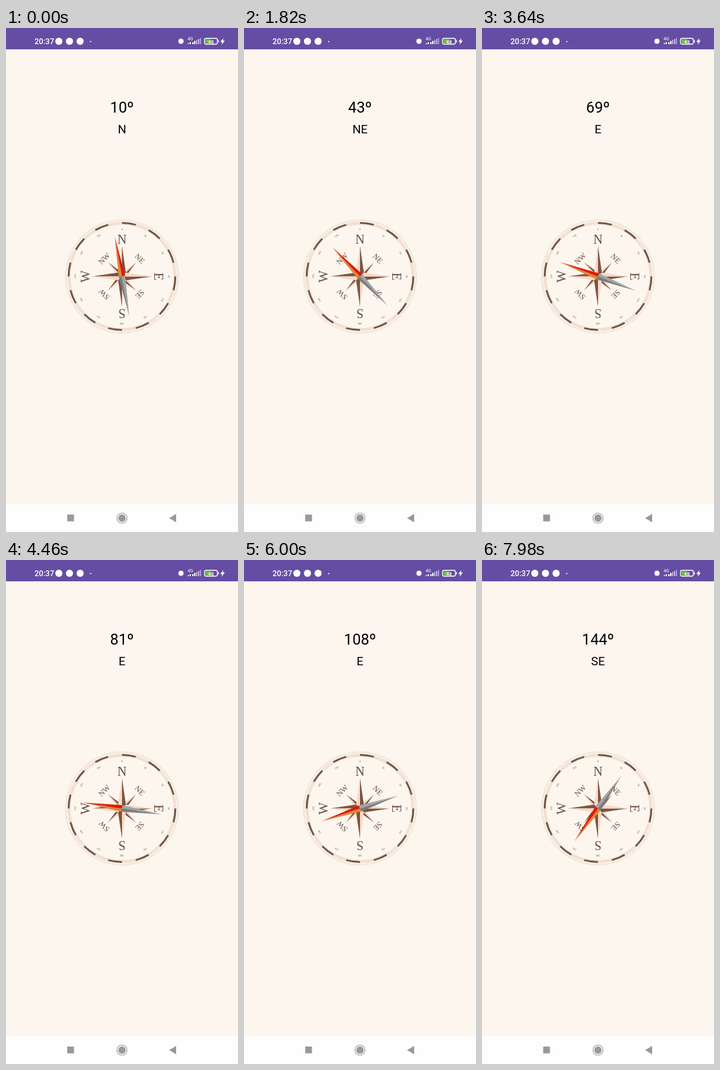
Write an HTML page that moves like this. It is 360x780 px and loops after 8 s.

```html
<!DOCTYPE html>
<html lang="en">
<head>
<meta charset="utf-8">
<title>Compass</title>
<style>
  html, body { margin: 0; width: 100%; height: 100%; overflow: hidden; background: #fdf6ef; }
  svg { display: block; width: 360px; height: 780px; }
  text { text-anchor: middle; font-family: Roboto, sans-serif; }
  .dial text { font-family: "Liberation Serif", serif; fill: #66503f; }
</style>
</head>
<body>
<svg viewBox="0 0 360 780">
  <rect width="360" height="780" fill="#fdf6ef"/>
  <rect width="360" height="33" fill="#654da4"/>

  <g fill="#fff">
    <text x="59.5" y="25" font-size="12" font-weight="500">20:37</text>
    <circle cx="82" cy="20.5" r="5.5"/>
    <circle cx="98.5" cy="20.5" r="5.5"/>
    <circle cx="115" cy="20.5" r="5.5"/>
    <circle cx="131.5" cy="21" r="1"/>
    <circle cx="271.5" cy="20.5" r="4"/>
    <text x="286" y="19" font-size="7">4G</text>
    <path d="M282 23.5h2v1.5h-2zM285 22h2v3h-2zM289 22h2v3h-2zM292 20h2v5h-2z"/>
    <path d="M295 18.5h2v6.5h-2zM298 17h2v8h-2zM301 15.5h1.5v9.5h-1.5z" opacity=".6"/>
    <rect x="308" y="16" width="20" height="9" rx="2.5" fill="none" stroke="#fff" stroke-width="1.3"/>
    <rect x="309.5" y="17.5" width="9" height="6" rx="1" fill="#6fbf3f"/>
    <rect x="329" y="18.5" width="1.2" height="4"/>
    <text x="318" y="23.5" font-size="8" font-weight="500">48</text>
    <path d="M337.5 15.5l-5 6h3l-1 4.5 5-6.5h-3z"/>
  </g>

  <text id="degrees" x="180" y="131" font-size="23.3"></text>
  <text id="heading" x="180" y="163" font-size="18.5"></text>

  <g transform="translate(180 384.5)">
    <g id="dial" class="dial"></g>
    <g id="needle">
      <path d="M0-62.5L-5 0H0z" fill="#d98a34"/>
      <path d="M0-62.5L5 0H0z" fill="#e61408"/>
      <path d="M0 62.5L-5 0H0z" fill="#7a7d80"/>
      <path d="M0 62.5L5 0H0z" fill="#a2a4a6"/>
    </g>
  </g>

  <rect y="737" width="360" height="43" fill="#fefefe"/>
  <g fill="#999">
    <rect x="95" y="753" width="10.5" height="10.5"/>
    <circle cx="180" cy="758.5" r="5.7"/>
    <circle cx="180" cy="758.5" r="7.8" fill="none" stroke="#999" stroke-width="1.1"/>
    <path d="M253 758.500L264 752v13z"/>
  </g>
</svg>
<script>
const LOOP = 8000;
const $ = id => document.getElementById(id);
const polar = (r, deg) => {
  const a = deg * Math.PI / 180;
  return [r * Math.sin(a), -r * Math.cos(a)].map(v => v.toFixed(2)).join(' ');
};

const arc = (r, from, to, color, width) =>
  `<path d="M${polar(r, from)}A${r} ${r} 0 0 1 ${polar(r, to)}" fill="none" stroke="${color}" stroke-width="${width}"/>`;
const ring = (r, color, width, dash = '') =>
  `<circle r="${r}" fill="none" stroke="${color}" stroke-width="${width}" stroke-dasharray="${dash}"/>`;
const label = (text, r, deg, size) =>
  `<text transform="rotate(${deg}) translate(0 ${-r})" y="${size * 0.33}" font-size="${size}">${text}</text>`;

// Each rose point is dark on its clockwise half and pale on the other.
const halfPoint = (deg, length, base, side, color) =>
  `<path d="M0 0L${polar(length, deg)}L${polar(base, deg + side * 45)}z" fill="${color}"/>`;
const rosePoint = (deg, length, base) =>
  halfPoint(deg, length, base, 1, '#7d5440') + halfPoint(deg, length, base, -1, '#f6d9c6');

function drawDial() {
  let out = ring(87, '#d6c6b6', 3, '0.6 1.6') + ring(82.8, '#f3dfd0', 3.2) + ring(80.6, '#ddc8b4', 0.6);
  for (let deg = 0; deg < 360; deg += 30) {
    out += arc(82.8, deg, deg + 15, '#6f5344', 2.8) + label(deg, 72.5, deg, 4);
  }
  for (let deg = 45; deg < 360; deg += 90) out += rosePoint(deg, 31, 6);
  for (let deg = 0; deg < 360; deg += 90) out += rosePoint(deg, 47, 8.5);
  ['N', 'NE', 'E', 'SE', 'S', 'SW', 'W', 'NW'].forEach((name, i) => {
    out += name.length > 1 ? label(name, 39, i * 45, 12) : label(name, 57, i * 45, 20);
  });
  $('dial').innerHTML = out;
}

// Sensor readings: [start of a run, evenly spaced readings until the next run].
const runs = [
  [0, 1], [160, 2], [440, 1], [580, 5], [1240, 5], [1820, 1], [1940, 4], [2380, 10],
  [3520, 1], [3640, 1], [3780, 7], [4600, 5], [5160, 1], [5300, 4], [5740, 9],
  [6840, 1], [6880, 9], [7980, 1]
];
const readings = runs.flatMap(([start, count], i) => {
  const end = i + 1 < runs.length ? runs[i + 1][0] : LOOP;
  return Array.from({ length: count }, (_, k) => Math.round((start + (end - start) * k / count) / 20) * 20);
});

const bearings = [[0, 10.4], [440, 19.5], [1820, 43.5], [3640, 69.4], [5160, 95.3], [6840, 122.5], [7980, 144.4]];
const slope = i => {
  const [t0, b0] = bearings[Math.max(0, i - 1)];
  const [t1, b1] = bearings[Math.min(bearings.length - 1, i + 1)];
  return (b1 - b0) / (t1 - t0);
};

// Smooth cubic through the measured bearings.
function bearingAt(t) {
  const i = Math.max(1, bearings.findIndex(([time]) => time >= t));
  const [[t0, b0], [t1, b1]] = [bearings[i - 1], bearings[i]];
  const span = t1 - t0, u = (t - t0) / span, v = 1 - u;
  return b0 * v * v * (1 + 2 * u) + b1 * u * u * (1 + 2 * v) +
    span * u * v * (slope(i - 1) * v - slope(i) * u);
}

function render(t) {
  const bearing = bearingAt(readings.filter(time => time <= t).pop());
  $('degrees').textContent = Math.floor(bearing) + 'º';
  $('heading').textContent = ['N', 'NE', 'E', 'SE'][Math.round(bearing / 45)];
  $('needle').setAttribute('transform', `rotate(${(-bearing).toFixed(2)})`);
}

drawDial();
render(0);
const start = performance.now();
function tick() {
  render((performance.now() - start) % LOOP);
  requestAnimationFrame(tick);
}
requestAnimationFrame(tick);
</script>
</body>
</html>
```
